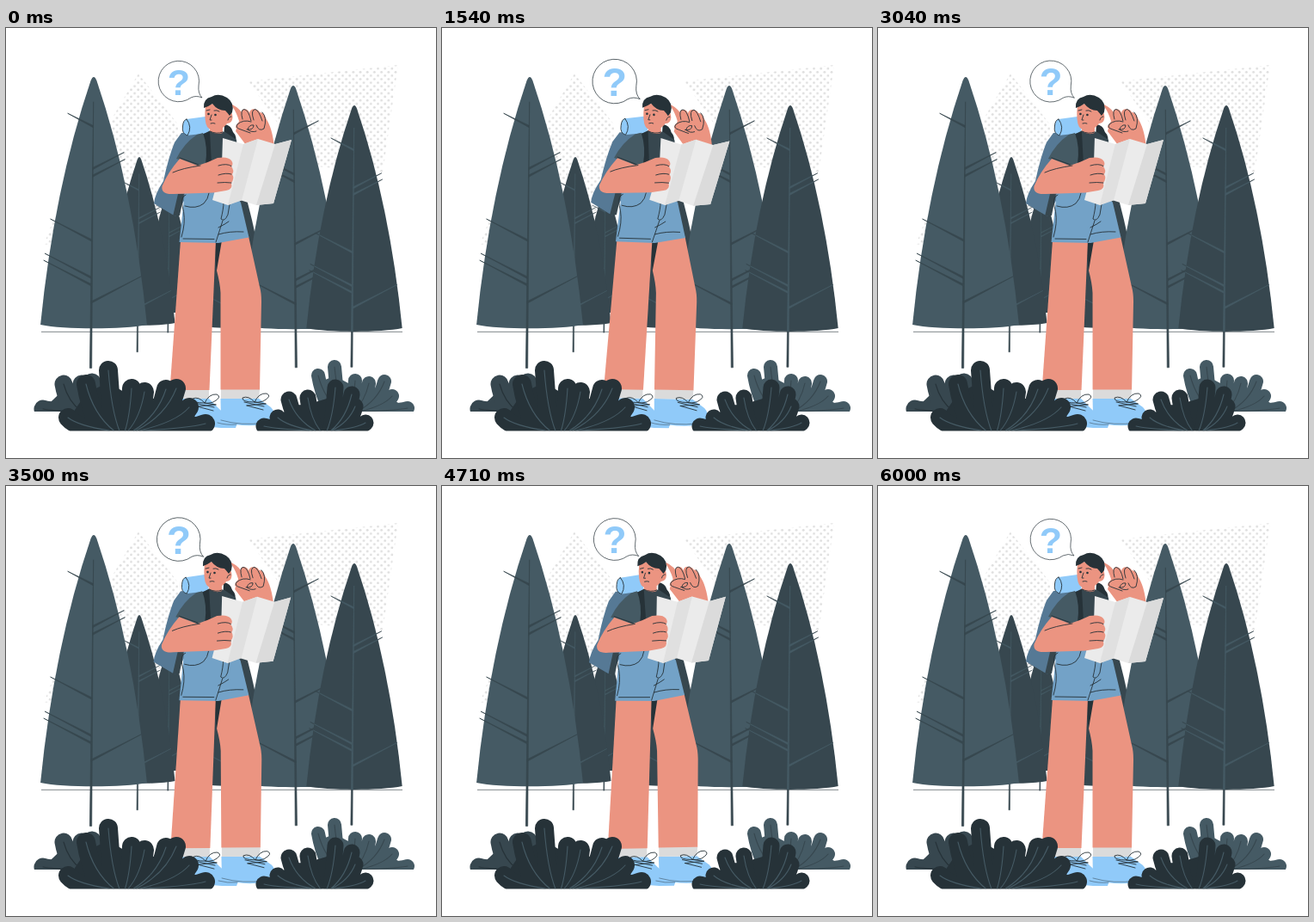
An HTML page for the animation above (6.04 s loop, 500x500 px).

```html
<!DOCTYPE html>
<html lang="en">
<head>
<meta charset="utf-8">
<title>Lost hiker</title>
<style>
  html, body { margin: 0; width: 100%; height: 100%; overflow: hidden; background: #fff; }
  svg { display: block; width: 100vw; height: 100vh; }
  .ink { fill: none; stroke: #263238; stroke-width: .9; stroke-linecap: round; stroke-linejoin: round; }
  .skin { fill: #eb9481; }
  .blue { fill: #90caf9; }
  .denim { fill: #73a2c7; }
  .pack { fill: #567995; }
  .dark { fill: #263238; }
  .slate { fill: #37474f; }
  .light { fill: #455a64; }
  .sock { fill: #dbdbdb; }
</style>
</head>
<body>
<svg viewBox="0 0 500 500">
  <defs>
    <pattern id="dots" width="8.2" height="8.2" patternUnits="userSpaceOnUse">
      <g fill="#dedede"><circle cx="2" cy="2" r="1.4"/><circle cx="6.100" cy="6.100" r="1.4"/></g>
    </pattern>
    <!-- a tree 100 units high, with its tip at the origin -->
    <path id="crown" d="M-1.200 1.500Q0 -1.500 1.200 1.500Q16 45 21.500 100C12 102 -12 102 -21.500 100Q-16 45 -1.200 1.500Z"/>
    <path id="wood"/>
    <clipPath id="inCrown"><use href="#crown"/></clipPath>
    <clipPath id="ground"><path d="M0 0H500V468.500H0Z"/></clipPath>
    <clipPath id="backGround"><path d="M0 0H500V446H0Z"/></clipPath>
  </defs>
  <path fill="url(#dots)" d="M154 53L200 112V235L45 252Q48 235 70 195ZM282 62L456 43 438 168 350 160Z"/>
  <path d="M41 353.300H461" stroke="#263238" stroke-width=".6"/>
  <g id="trees"></g>
  <g id="backBushes" clip-path="url(#backGround)"></g>

  <g id="hiker">
    <!-- backpack -->
    <path class="pack" d="M204 122H234L240 195 212 192 197 219 172 204Q173 193 183 178 189 150 196 133Z"/>
    <path class="slate" d="M200 193H207L202 218 194 219Z"/>
    <path class="blue" d="M210 106L232 103Q238 112 236 122L210 125Q205 123 205.500 115 206 107 210 106Z"/>
    <path class="ink" d="M210 106Q217 115 211 125Q204 123 205.500 114Q206 107 210 106"/>

    <!-- shoes, socks, legs -->
    <path class="blue" d="M200 431H236L247 442Q252 448 265 452 271 457 267 465H250L205 461Z"/>
    <path class="blue" d="M249.500 431H294L308 441Q313 446 312 455L300 461Q274 465 250 457Z"/>
    <path class="ink" stroke-opacity=".5" d="M246 459Q256 462 268 461M250 456Q274 463 300 459"/>
    <path class="sock" d="M203 420H236V431H203ZM250 420H295L294 431H250Z"/>
    <path class="ink" id="laces" d="M231 436Q236 425 245 426 252 429 241 435 234 437 231 436 224 428 217 431 216 436 231 436L244 438M219 436L242 441M222 440L244 438M222 440L241 445"/>
    <use href="#laces" x="58" y="-1"/>
    <path class="dark" d="M242 247H254L245 284Z"/>
    <path class="skin" d="M203 247H244L236.500 421H190.500Z"/>
    <path class="skin" d="M251 247L282 242 295 301Q297 308 297 318L295 420.500H249.500V308Q249 297 245 282Z"/>

    <!-- raised arm and ponytail -->
    <path class="skin" d="M263 89Q273 94 277 103L302 105Q310 116 312 140H282L267 120 271 108Q268 98 263 91Z"/>
    <path class="skin" d="M274 109Q271 95 277 94.500 282 94 283 99 284 93.500 290 94.500 294 95 295 98 301 98 303 108L305 122 284 124 267 116Q268 109 274 109Z"/>
    <path class="ink" d="M275 106Q272 95 277 94.500 282 95 285 108M288 107Q284 95 290 94.500 294 96 298 108M298 98Q304 104 300 117 294 121 291 113M285 109Q276 106 269 112 266 116 273 118L284 122M280 118Q288 119 288 113 283 112 281 118 286 122 291 120"/>
    <path class="dark" d="M254 112Q262 113 264 121 269 126 267 134L253 130Z"/>

    <!-- torso -->
    <path class="slate" d="M238 119L255 121 268 130 274 205H208L218 158 220 128Z"/>
    <path class="skin" d="M238 112H252V122Q245 125 237 120Z"/>
    <path class="ink" d="M237 120Q245 124 252 121"/>
    <path class="denim" d="M208 190L262 188 273 203 282.500 243.500 247 250 201.500 249Z"/>
    <path class="dark" d="M228 124L237 120Q238 140 239 158L231 160Q235 140 228 124Z"/>
    <path class="light" d="M222 124L229 122Q235 138 232 158L224 160 198 152Q207 134 222 124Z"/>
    <path class="ink" d="M202 151L224 159M209 194Q203 196 205 207 209 220 206 235L204 243M208 207Q221 211 230 204 235 199 236 192M206 245L242 245.500M253 203Q253 210 250 222 254 226 258 217L260 205M244 249L252 224M247 240Q260 236 276 237M247 232Q255 228 259 225"/>

    <!-- map and holding hand -->
    <path fill="#ebebeb" d="M252 128L276 135 293 129 313 135 332 130 311 204 291 206 272 200 258 206 240 200 251 158Z"/>
    <path fill="#e0e0e0" d="M276 135L293 129 274 200.500 258 206Z"/>
    <path fill="#dbdbdb" d="M313 135L332 130 311 204 291 206Z"/>
    <path class="skin" d="M202 152L223 160Q236 156 246 151 258 149 262 154 265 158 262 161 266 166 263 170 266 175 262 180 264 188 256 189L241 191.500 195 193Q180 194 181.500 184 188 168 202 152Z"/>
    <path class="ink" d="M194 168Q205 163 226 160M247 160Q257 157 262 160.500M247 171Q256 168 262 170M246 180Q255 179 262 180"/>

    <!-- head -->
    <path class="skin" d="M232 90Q230 108 234 115 239 121 247 118.500 254 116 257 111 263 111 263.500 104 263 97 260 95L255 85Z"/>
    <path class="dark" d="M230 93Q229 82 239 80 247 75 257 81 266 87 263 98L260 102Q257 98 255 96 246 96 240 88 236 91 230 93Z"/>
    <g class="dark"><circle cx="235.500" cy="100" r="1.300"/><circle cx="243.500" cy="101" r="1.300"/></g>
    <path class="ink" d="M233 96L237 95M242 96Q245 95 248 97M239 101L237 107H239M238 111Q241 110 243 111M258 107Q259 103 262 103"/>
  </g>

  <g id="frontBushes" clip-path="url(#ground)"></g>
  <g id="bubble">
    <path d="M224 67A23.700 23.700 0 1 0 215 81Q221 78 228 81 223 76 224 67Z" fill="#fff" stroke="#263238" stroke-width=".7"/>
    <text class="blue" x="201" y="78" text-anchor="middle" font-family="Liberation Sans, Arial, sans-serif" font-weight="700" font-size="43">?</text>
  </g>
</svg>
<script>
const $ = id => document.getElementById(id);
const DARK = '#37474f', LIGHT = '#455a64', INK = '#263238';

// Trunk plus twigs that get longer towards the ground.
function woodPath() {
  const trunk = y => -y * .0115;
  const twig = (y, side) => {
    const x = trunk(y), length = 7.5 + .14 * y;
    return `M${x} ${y - .4}L${x + side * length} ${y - .52 * length}L${x} ${y + .4}Z`;
  };
  return 'M-.1 10L-.8 117.5H-1.6Z' +
    [20, 66, 81, 84].map(y => twig(y, -1)).join('') +
    [37, 40, 91].map(y => twig(y, 1)).join('');
}

function tree(x, top, base, color, flip = 1) {
  const s = (base - top) / 100;
  const wood = (c, extra = '') => `<g ${extra}><use href="#wood" fill="${c}" stroke="${c}" stroke-width=".25"/></g>`;
  $('trees').innerHTML += `<g transform="translate(${x} ${top}) scale(${s * flip} ${s})">
    <use href="#crown" fill="${color}"/>${wood(DARK)}
    ${color === DARK ? wood(LIGHT, 'clip-path="url(#inCrown)"') : ''}</g>`;
}

// Each leaf is a thick round stroke from the root to its tip, with a thin vein inside.
function bush(layer, fill, vein, [rx, ry], width, tips) {
  let leaves = '', veins = '', body = `M${rx} ${ry}`;
  for (const [x, y] of tips) {
    const dx = x - rx, dy = y - ry;
    leaves += `M${rx + dx * .6} ${ry}Q${rx + dx * .9} ${ry + dy * .5} ${x} ${y}`;
    veins += `M${rx + dx * .25} ${ry}Q${rx + dx * .8} ${ry + dy * .35} ${x} ${y}`;
    body += `L${rx + dx} ${ry + dy * .8}`;
  }
  $(layer).innerHTML += `<g stroke-linecap="round" fill="none">
    <path d="${body}Z" fill="${fill}"/>
    <path d="${leaves}" stroke="${fill}" stroke-width="${width}"/>
    <path d="${veins}" stroke="${vein}" stroke-width="1.1"/></g>`;
}

$('wood').setAttribute('d', woodPath());
tree(265, 155, 346, DARK, -1);
tree(190, 185, 329, DARK);
tree(155, 150, 343, DARK);
tree(102, 57, 345, LIGHT);
tree(334, 67, 346, LIGHT, -1);
tree(405, 90, 349, DARK);

bush('backBushes', DARK, INK, [95, 446], 21, [[43, 443], [67, 414], [88, 414], [100, 412]]);
bush('backBushes', LIGHT, DARK, [398, 446], 16,
  [[363, 404], [382, 394], [406, 410], [422, 413], [440, 411], [449, 428], [467, 442]]);
bush('frontBushes', INK, LIGHT, [136, 468], 22,
  [[72, 453], [93, 414], [119, 398], [146, 419], [161, 423], [186, 420], [198, 419], [213, 441], [232, 460]]);
bush('frontBushes', INK, LIGHT, [370, 468], 19,
  [[300, 463], [316, 453], [329, 432], [351, 430], [383, 418], [402, 426], [406, 440], [418, 459]]);

const LOOP = 6040, PERIOD = 6000;
const swayKeys = [[0, 0], [1500, 1], [4500, -1], [6000, 0]];
const beatKeys = [[0, 1], [300, 1.1], [900, 1], [1200, 1], [1500, 1.1], [1800, 1], [3000, 1]];

function at(keys, t) {
  const i = keys.findIndex(k => k[0] > t);
  const [t0, a] = keys[i - 1], [t1, b] = keys[i];
  return a + (b - a) * (t - t0) / (t1 - t0);
}

function frame() {
  const t = Math.min(performance.now() % LOOP, PERIOD - 1);
  $('hiker').setAttribute('transform', `rotate(${at(swayKeys, t)} 252 272)`);
  $('bubble').setAttribute('transform', `translate(202.5 61.5) scale(${at(beatKeys, t % 3000)}) translate(-202.5 -61.5)`);
  requestAnimationFrame(frame);
}
frame();
</script>
</body>
</html>
```
